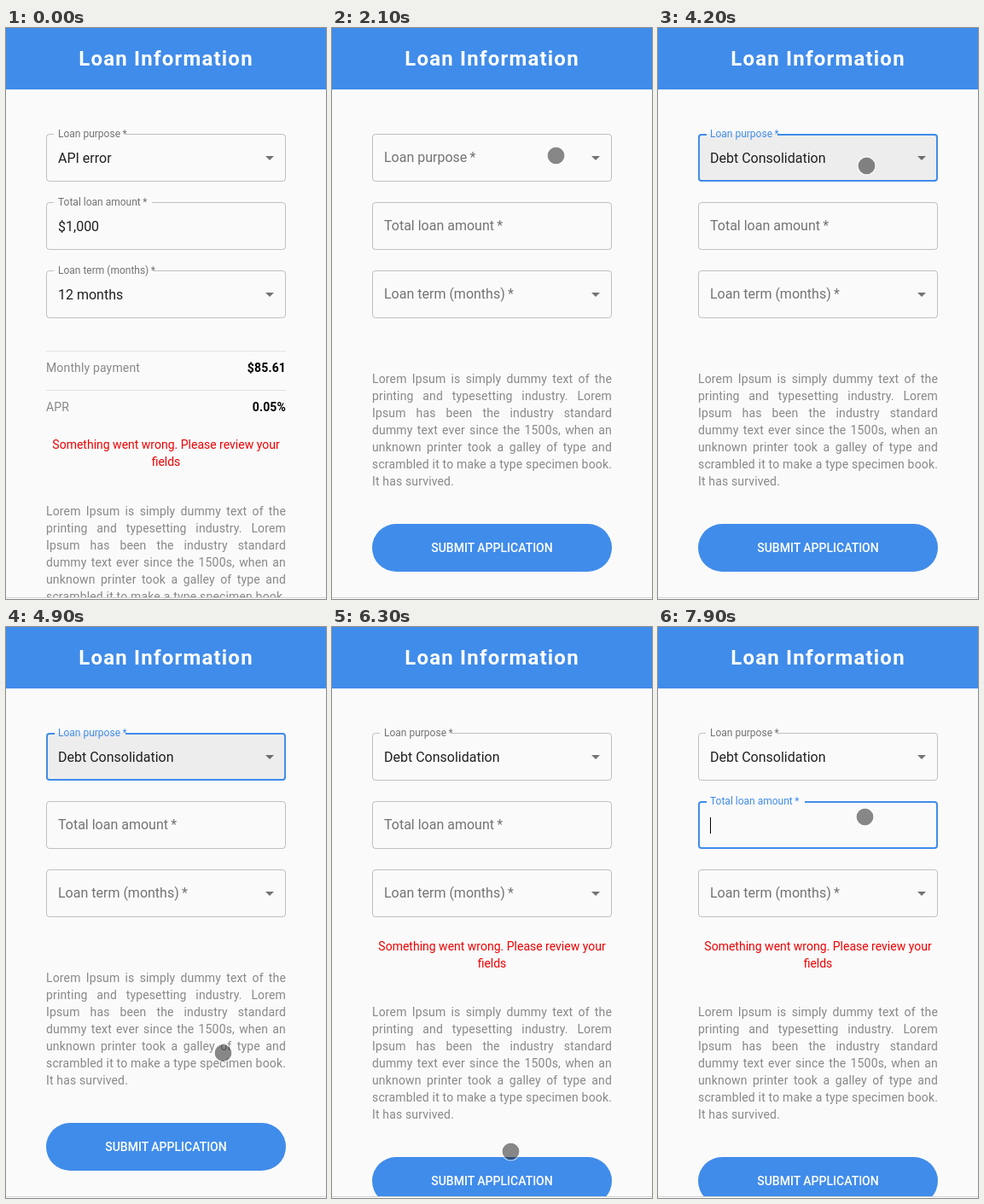
Animation of 375 by 669 pixels, one loop 8000 ms. Source, as an HTML page:

```html
<!DOCTYPE html>
<html lang="en">
<head>
<meta charset="utf-8">
<title>Loan form</title>
<style>
  :root { --blue: #408cea; --grey: rgba(0,0,0,.54); }
  * { box-sizing: border-box; }
  html, body { margin: 0; width: 100%; height: 100%; overflow: hidden; background: #fff; }
  body { font: 16px Roboto, sans-serif; color: rgba(0,0,0,.87); }
  #page { position: absolute; left: 0; top: 0; width: 375px; height: 668px; overflow: hidden;
    background: #fafafa; border-bottom: 1px solid #d2d2d2; }
  #page > *, .field > *, .row > * { position: absolute; }
  h1 { left: 0; top: 0; width: 375px; margin: 0; background: var(--blue); color: #fff;
    font-size: 24px; line-height: 72px; letter-spacing: .05em; text-align: center; }

  .field { left: 47px; width: 281px; height: 56px; }
  .field fieldset { inset: -5px 0 0; margin: 0; padding: 0 8px; min-width: 0;
    border: 1px solid rgba(0,0,0,.23); border-radius: 4px; }
  .field legend { height: 11px; padding: 0; overflow: hidden; visibility: hidden;
    font-size: 12px; line-height: 11px; white-space: nowrap; }
  .field legend span { display: inline-block; padding: 0 5px; }
  .field.focus fieldset { border: 2px solid var(--blue); }
  .field.focus.select { background: rgba(0,0,0,.05); border-radius: 4px; }
  .label { left: 0; top: 0; line-height: 16px; white-space: nowrap; transform-origin: 0 0; }
  .value { left: 14px; top: 19px; line-height: 19px; white-space: nowrap; }
  .arrow { right: 7px; top: 16px; width: 24px; height: 24px; fill: var(--grey); }
  .caret { left: 14px; top: 19px; width: 1px; height: 19px; background: #000; }

  .row, #text { left: 47px; width: 281px; font-size: 14px; line-height: 20px;
    letter-spacing: .01071em; color: #888; }
  .row { height: 46px; border-top: 1px solid rgba(0,0,0,.1); }
  .row > * { top: 9px; }
  .row b { right: 0; color: #000; }
  #error { left: 47px; width: 281px; font-size: 14px; line-height: 20px; text-align: center; color: #f00000; }
  #text { margin: 0; text-align: justify; }
  #button { left: 47px; width: 281px; height: 56px; border-radius: 28px; overflow: hidden;
    background: var(--blue); color: #fff; font-size: 14px; font-weight: 500; line-height: 56px; text-align: center; }
  #ripple { position: absolute; left: -12px; top: -143px; width: 350px; height: 350px;
    border-radius: 50%; background: #fff; }

  #menu { left: 47px; top: 120px; width: 281px; height: 160px; padding: 8px 0; border-radius: 4px;
    background: #fff; transform-origin: 0 32px;
    box-shadow: 0 5px 5px -3px rgba(0,0,0,.2), 0 8px 10px 1px rgba(0,0,0,.14), 0 3px 14px 2px rgba(0,0,0,.12); }
  #menu div { height: 48px; padding-left: 16px; line-height: 48px; }
  #menu div:first-child { background: #ebebeb; }
  #status { left: 0; top: 644px; width: 124px; height: 23px; padding-left: 5px;
    border: 1px solid #c8c8c8; border-width: 1px 1px 0 0; border-radius: 0 4px 0 0;
    background: #f1f1f1; color: #666; font-size: 11px; line-height: 22px; }
  #cursor { left: -11px; top: -11px; width: 22px; height: 22px; border-radius: 50%;
    border: 1.5px solid rgba(255,255,255,.65); background: rgba(30,30,30,.52); background-clip: padding-box; }
</style>
</head>
<body>
<div id="page">
  <h1>Loan Information</h1>
  <div id="summary">
    <div class="row" style="position:absolute;top:378px"><span style="white-space:nowrap">Monthly payment</span><b>$85.61</b></div>
    <div class="row" style="position:absolute;top:424px"><span>APR</span><b>0.05%</b></div>
  </div>
  <div id="error">Something went wrong. Please review your fields</div>
  <p id="text">Lorem Ipsum is simply dummy text of the printing and typesetting industry. Lorem Ipsum has been the industry standard dummy text ever since the 1500s, when an unknown printer took a galley of type and scrambled it to make a type specimen book. It has survived.</p>
  <div id="button">SUBMIT APPLICATION<div id="ripple"></div></div>
  <div id="menu"><div>Debt Consolidation</div><div>Personal</div><div>API error</div></div>
  <div id="status">Waiting for response…</div>
  <div id="cursor"></div>
</div>
<script>
const LOOP = 8000, STEP = 100;
const RELOAD = 1200, OPEN = 2650, CLOSE = 3450, PRESS = 5800, FAIL = 5900, TYPE = 7650;
const $ = id => document.getElementById(id);
const clamp = v => Math.min(1, Math.max(0, v));
const smooth = p => p * p * (3 - 2 * p);
const easeOut = (t, start, ms) => 1 - (1 - clamp((t - start) / ms)) ** 3;
const easeBoth = (t, start, ms) => smooth(clamp((t - start) / ms));
const show = (el, on) => { el.style.display = on ? '' : 'none'; };

// time, x, y
const path = [
  [1800, 217, 92], [2000, 265, 140], [2100, 262, 149], [2700, 262, 149],
  [3200, 247, 154], [4100, 247, 154], [4200, 244, 161], [4800, 254, 521],
  [5000, 254, 476], [5100, 254, 476], [5600, 210, 613], [5800, 210, 613],
  [6000, 209, 614], [6800, 209, 614], [7200, 243, 219], [7300, 242, 222], [LOOP, 242, 222]
];

function cursorAt(t) {
  const i = path.findIndex(k => k[0] > t);
  const [t0, x0, y0] = path[i - 1], [t1, x1, y1] = path[i];
  const p = smooth((t - t0) / (t1 - t0));
  return [x0 + (x1 - x0) * p, y0 + (y1 - y0) * p];
}

function makeField(name, top, select) {
  const el = document.createElement('div');
  el.className = 'field' + (select ? ' select' : '');
  el.style.top = top + 'px';
  el.innerHTML = `<fieldset><legend><span>${name}${select ? '' : '&nbsp;*'}</span></legend></fieldset>
    <div class="label">${name}&thinsp;*</div><div class="value"></div>` +
    (select ? '<svg class="arrow" viewBox="0 0 24 24"><path d="M7 10l5 5 5-5z"/></svg>'
            : '<div class="caret"></div>');
  $('page').insertBefore(el, $('summary'));
  const [legend, label, value] = ['legend', '.label', '.value'].map(s => el.querySelector(s));
  // shrink: label position 0..1, tint: label blueness 0..1
  return (text, shrink, focus = false, tint = 0) => {
    el.classList.toggle('focus', focus);
    legend.style.maxWidth = shrink > .5 ? '1000px' : '.01px';
    label.style.transform = `translate(14px, ${20 - 26 * shrink}px) scale(${1 - shrink / 4})`;
    label.style.color = `color-mix(in srgb, var(--blue) ${tint * 100}%, var(--grey))`;
    value.textContent = text;
    if (!select) show(el.querySelector('.caret'), focus);
  };
}

const purpose = makeField('Loan purpose', 124, true);
const amount = makeField('Total loan amount', 204, false);
const term = makeField('Loan term (months)', 284, true);

function render(t) {
  const filled = t < RELOAD, failed = t >= FAIL;

  purpose(filled ? 'API error' : t >= CLOSE ? 'Debt Consolidation' : '',
    filled ? 1 : easeOut(t, OPEN, 200),
    t >= CLOSE && t < PRESS,
    easeOut(t, CLOSE, 200) - easeOut(t, PRESS - 50, 200));
  amount(filled ? '$1,000' : '', filled ? 1 : easeOut(t, TYPE, 200), t >= TYPE, easeOut(t, TYPE, 200));
  term(filled ? '12 months' : '', filled ? 1 : 0);

  show($('summary'), filled);
  show($('error'), filled || failed);
  $('error').style.top = (filled ? 478 : 364) + 'px';
  const top = filled ? 556 : failed ? 441 : 401;
  $('text').style.top = top + 'px';
  $('button').style.top = top + 180 + 'px';
  $('ripple').style.transform = `scale(${easeOut(t, PRESS - 50, 550)})`;
  $('ripple').style.opacity = t < PRESS ? 0 : .3 * (1 - easeBoth(t, FAIL, 400));

  const closing = t >= CLOSE;
  const fade = closing ? 1 - easeBoth(t, CLOSE, 250) : easeBoth(t, OPEN, 267);
  const grow = closing ? 1 - easeBoth(t, CLOSE + 83, 167) : easeBoth(t, OPEN, 178);
  show($('menu'), fade > 0);
  $('menu').style.opacity = fade;
  $('menu').style.transform = `scale(${.75 + .25 * grow}, ${.5625 + .4375 * grow})`;

  show($('status'), t >= 800 && t < 1600);
  $('status').style.opacity = t < 1500 ? 1 : .5;

  const visible = t >= path[0][0];
  show($('cursor'), visible);
  if (visible) {
    const [x, y] = cursorAt(t);
    $('cursor').style.transform = `translate(${x + .5}px, ${y + .5}px)`;
  }
}

const begin = performance.now();
function frame() {
  const t = (performance.now() - begin) % LOOP;
  render(Math.floor(t / STEP) * STEP);
  requestAnimationFrame(frame);
}
frame();
</script>
</body>
</html>
```
